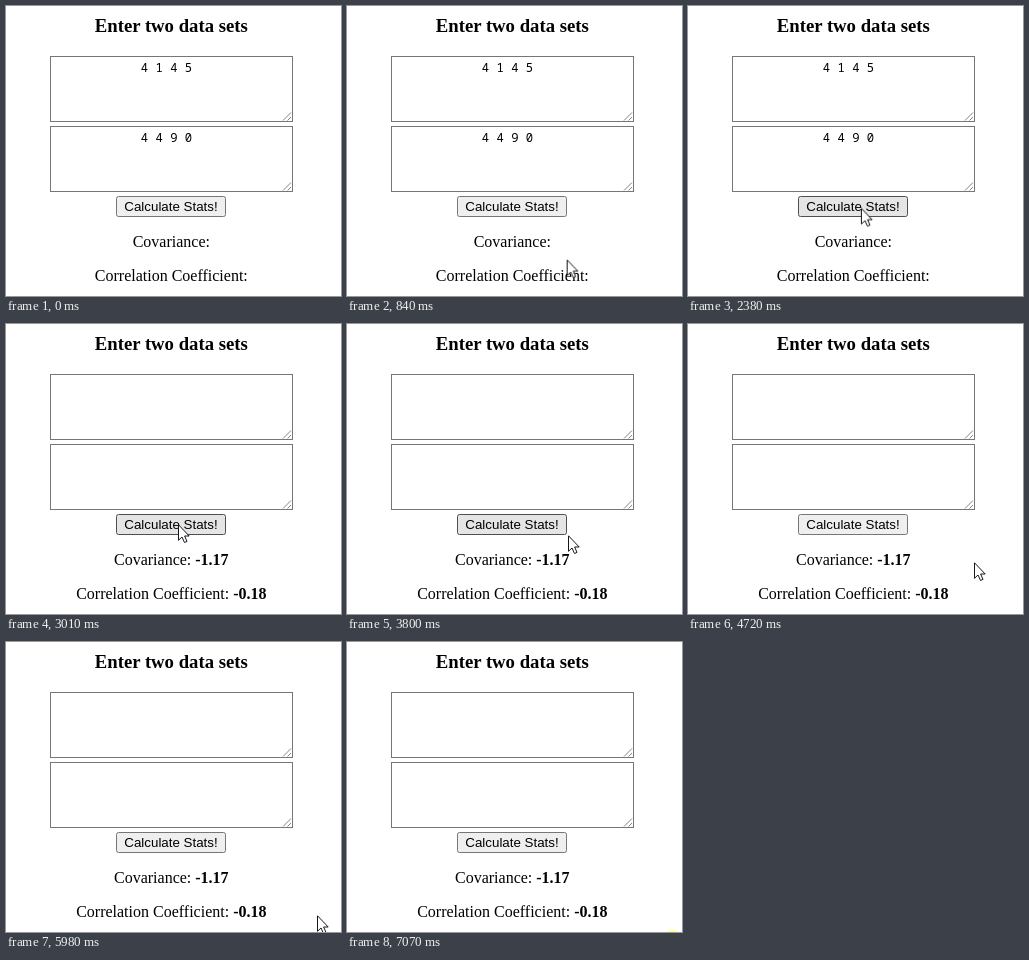
Animation of 335x290 px, one loop 7150 ms. Source, as an HTML page:

```html
<!DOCTYPE html>
<html lang="en">
<head>
<meta charset="utf-8">
<title>Two data sets</title>
<style>
  html, body { margin: 0; width: 100%; height: 100%; overflow: hidden; background: #fff; }
  svg { display: block; width: 335px; height: 290px; }

  text { text-anchor: middle; white-space: pre; }
  .page { font: 16px "Liberation Serif", serif; }
  .title { font-size: 18.72px; font-weight: bold; }
  .value { font-weight: bold; }
  .entry { font: 12.22px "Noto Sans Mono", monospace; }
  .label { font: 13.333px "Liberation Sans", sans-serif; }
  .box { fill: #fff; stroke: #767676; }
  .grip { fill: none; stroke: #777; stroke-width: .9; }

  /* One loop is 7150 ms; every part shares it. */
  .before, .after, .button, .cursor, .glow { animation: 7150ms step-end infinite; }
  .before { animation-name: before; }
  .after { animation-name: after; }
  .button { animation-name: button; }
  .cursor { animation-name: cursor; }
  .glow { animation-name: glow; fill: #ffff96; }

  @keyframes before {
    0% { visibility: visible; }
    39.02%, 100% { visibility: hidden; }
  }
  @keyframes after {
    0% { visibility: hidden; }
    39.02%, 100% { visibility: visible; }
  }
  @keyframes glow {
    0% { visibility: hidden; }
    98.47%, 100% { visibility: visible; }
  }

  /* normal, hover, pressed, hover, normal */
  @keyframes button {
    0%, 54.545%, 100% { fill: #efefef; stroke: #767676; }
    29.231%, 39.02% { fill: #e5e5e5; stroke: #4f4f4f; }
    37.2% { fill: #f5f5f5; stroke: #8d8d8d; }
  }

  /* The pointer moves in short bursts with a pause after each. */
  @keyframes cursor {
    0% { transform: translate(283px, 295px); }
    3.636% { transform: translate(283px, 289px); animation-timing-function: steps(12, start); }
    14.3% { transform: translate(207px, 246px); }
    14.825% { transform: translate(207px, 246px); animation-timing-function: steps(8, start); }
    21.818% { transform: translate(188px, 225px); animation-timing-function: steps(4, start); }
    25.035% { transform: translate(183px, 220px); animation-timing-function: steps(12, start); }
    34.797% { transform: translate(172px, 200px); }
    45.035% { transform: translate(172px, 200px); animation-timing-function: steps(10, start); }
    53.98% { transform: translate(221px, 211px); }
    54.545% { transform: translate(221px, 211px); animation-timing-function: steps(2, start); }
    55.1% { transform: translate(228px, 213px); }
    56.224% { transform: translate(228px, 213px); animation-timing-function: steps(12, start); }
    66.88% { transform: translate(286px, 238px); }
    67.413% { transform: translate(286px, 238px); animation-timing-function: steps(12, start); }
    78.07% { transform: translate(302px, 258px); }
    78.601% { transform: translate(302px, 258px); animation-timing-function: steps(6, start); }
    84.62% { transform: translate(311px, 273px); }
    85.035% { transform: translate(311px, 273px); animation-timing-function: steps(5, start); }
    89.22% { transform: translate(316px, 283px); }
    89.79% { transform: translate(316px, 283px); animation-timing-function: steps(3, start); }
    92.3%, 100% { transform: translate(318px, 292px); }
  }
</style>
</head>
<body>
<svg viewBox="0 0 335 290">
  <defs>
    <g id="field">
      <rect class="box" x="44.5" y=".5" width="242" height="65"/>
      <path class="grip" d="M277 64.5l8-8M281.500 64.500l3.500-3.500"/>
    </g>
  </defs>

  <g class="page">
    <text class="title" x="165.300" y="26">Enter two data sets</text>
    <use href="#field" y="50"/>
    <use href="#field" y="120"/>

    <g class="before">
      <g class="entry">
        <text x="160.500" y="66">4 1 4 5</text>
        <text x="160.500" y="136">4 4 9 0</text>
      </g>
      <text x="165.300" y="241">Covariance:</text>
      <text x="165.300" y="275">Correlation Coefficient:</text>
    </g>
    <g class="after">
      <text x="165.300" y="241">Covariance: <tspan class="value">-1.17</tspan></text>
      <text x="165.300" y="275">Correlation Coefficient: <tspan class="value">-0.18</tspan></text>
    </g>
  </g>

  <rect class="button" x="110.500" y="190.500" width="109" height="20" rx="2"/>
  <text class="label" x="165" y="205">Calculate Stats!</text>

  <circle class="glow" cx="325.500" cy="299" r="11"/>
  <path class="cursor" d="M.5 .8V16.300L4 13L6.500 18.500L9 17.400L6.600 12H11.200Z"
        fill="#fff" stroke="#15151f" stroke-linejoin="round"/>
</svg>
</body>
</html>
```
